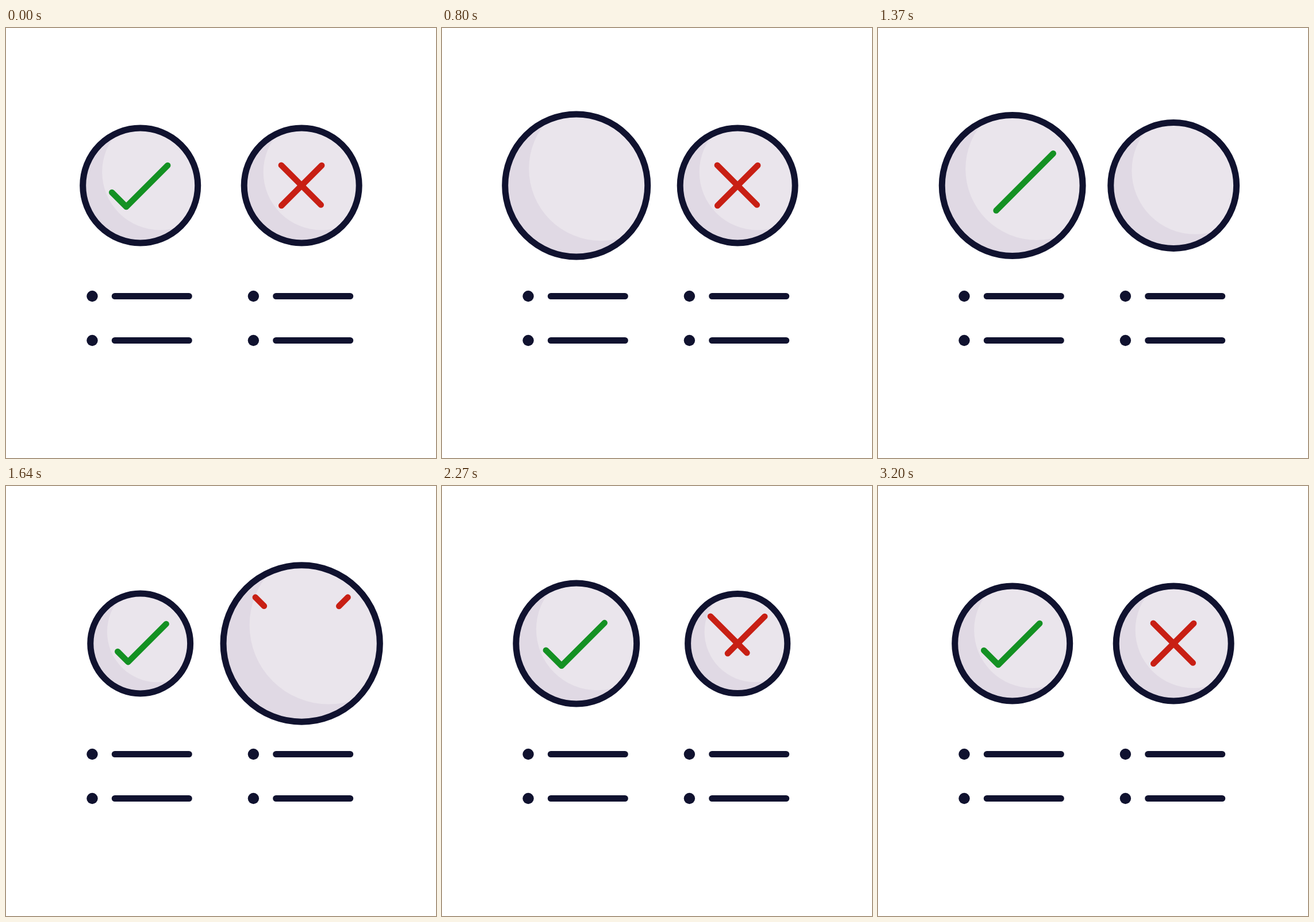
These frames come from a looping animation (748 px wide and 748 px high, 3320 ms). An HTML page with a canvas:

```html
<!DOCTYPE html>
<html>
<head>
<meta charset="utf-8">
<style>
html, body { margin: 0; width: 100%; height: 100%; overflow: hidden; background: #fff; }
canvas { display: block; }
</style>
</head>
<body>
<canvas id="stage" width="748" height="748"></canvas>
<script>
const ctx = document.getElementById('stage').getContext('2d');
const LOOP = 3320, HOLD = 230, STEP = 30;
const NAVY = '#10122f', LIGHT = '#eae5ec', SHADE = '#e0d9e4', GREEN = '#149123', RED = '#c81f14';
const RADIUS = 99.75, MIDDLE = 274;

// Eases through [time, value, bias] poses; a bias above 1 moves earlier in its segment
function motion(...poses) {
  return t => {
    const next = poses.findIndex(p => p[0] > t);
    if (next < 0) return poses[poses.length - 1][1];
    if (!next) return poses[0][1];
    const [t0, v0] = poses[next - 1], [t1, v1, bias = 1] = poses[next];
    const u = 1 - ((t1 - t) / (t1 - t0)) ** bias;
    return v0 + (v1 - v0) * u * u * (3 - 2 * u);
  };
}

// Each badge dips, swells, shrinks and settles
const swing = (start, dip, swell, shrink, rebound, rest, peak, echo) => motion(
  [start, 1], [dip, 0.8], [swell, peak, 1.4], [shrink, 0.855], [rebound, echo], [rest, 1]);

// Each mark is wiped out from one end, then slides back in from its top
const check = {
  x: 233.7,
  scale: swing(210, 460, 1140, 1690, 2190, 2600, 1.45, 1.055),
  from: motion([650, -49.5], [650, 61.6], [850, 61.6], [2190, -50.5, 2.3], [2600, -49.5]),
  to: motion([210, 47.5], [530, -49.5], [650, -49.5], [650, 61.6], [1070, 61.6], [2030, 46.2], [2600, 47.5]),
  draw(at, from, to) {
    const bend = -24.5;
    const spots = from < bend && to > bend ? [from, bend, to] : [from, to];
    line(GREEN, spots.map(p => at(p, 37 - Math.abs(p - bend))));
  }
};
const cross = {
  x: 514.2,
  scale: swing(850, 1080, 1830, 2310, 2790, 3200, 1.397, 1.072),
  from: motion([860, -35], [1180, 35], [1300, 35], [1300, -59], [2100, -59], [2790, -29], [3200, -35]),
  to: motion([1300, 35], [1300, -59], [1372, -59], [2670, 43], [3200, 35]),
  draw(at, from, to) {
    const falling = p => 0.985 * (p + 59) - 59;
    line(RED, [from, to].map(falling).map(p => at(p, p)));
    line(RED, [from, to].map(p => at(-p, p)));
  }
};

function circle(x, y, r) {
  ctx.beginPath();
  ctx.arc(x, y, r, 0, 2 * Math.PI);
}

function disc(x, y, r, color) {
  circle(x, y, r);
  ctx.fillStyle = color;
  ctx.fill();
}

function line(color, points, width = 10.5) {
  ctx.beginPath();
  points.forEach(p => ctx.lineTo(...p));
  ctx.strokeStyle = color;
  ctx.lineWidth = width;
  ctx.stroke();
}

function badge(mark, t) {
  const s = mark.scale(t), r = RADIUS * s + 0.25;
  ctx.save();
  disc(mark.x, MIDDLE, r, SHADE);
  ctx.clip();
  disc(mark.x + 34.5 * s, MIDDLE - 23.5 * s, 101 * s, LIGHT);
  ctx.restore();

  circle(mark.x, MIDDLE, r);
  ctx.strokeStyle = NAVY;
  ctx.lineWidth = 11;
  ctx.stroke();

  const from = mark.from(t), to = mark.to(t);
  if (to - from > 0.5) mark.draw((x, y) => [mark.x + x * s, MIDDLE + y * s], from, to);
}

function list(x) {
  for (const y of [466.5, 543.5]) {
    disc(x, y, 9.7, NAVY);
    line(NAVY, [[x + 39.3, y], [x + 168.3, y]], 11);
  }
}

function draw(t) {
  ctx.fillStyle = '#fff';
  ctx.fillRect(0, 0, 748, 748);
  ctx.lineCap = ctx.lineJoin = 'round';
  list(150);
  list(430.4);
  badge(check, t);
  badge(cross, t);
}

function tick() {
  const t = performance.now() % LOOP;
  draw(t < HOLD ? 0 : HOLD + Math.floor((t - HOLD) / STEP) * STEP);
  requestAnimationFrame(tick);
}
tick();
</script>
</body>
</html>
```
